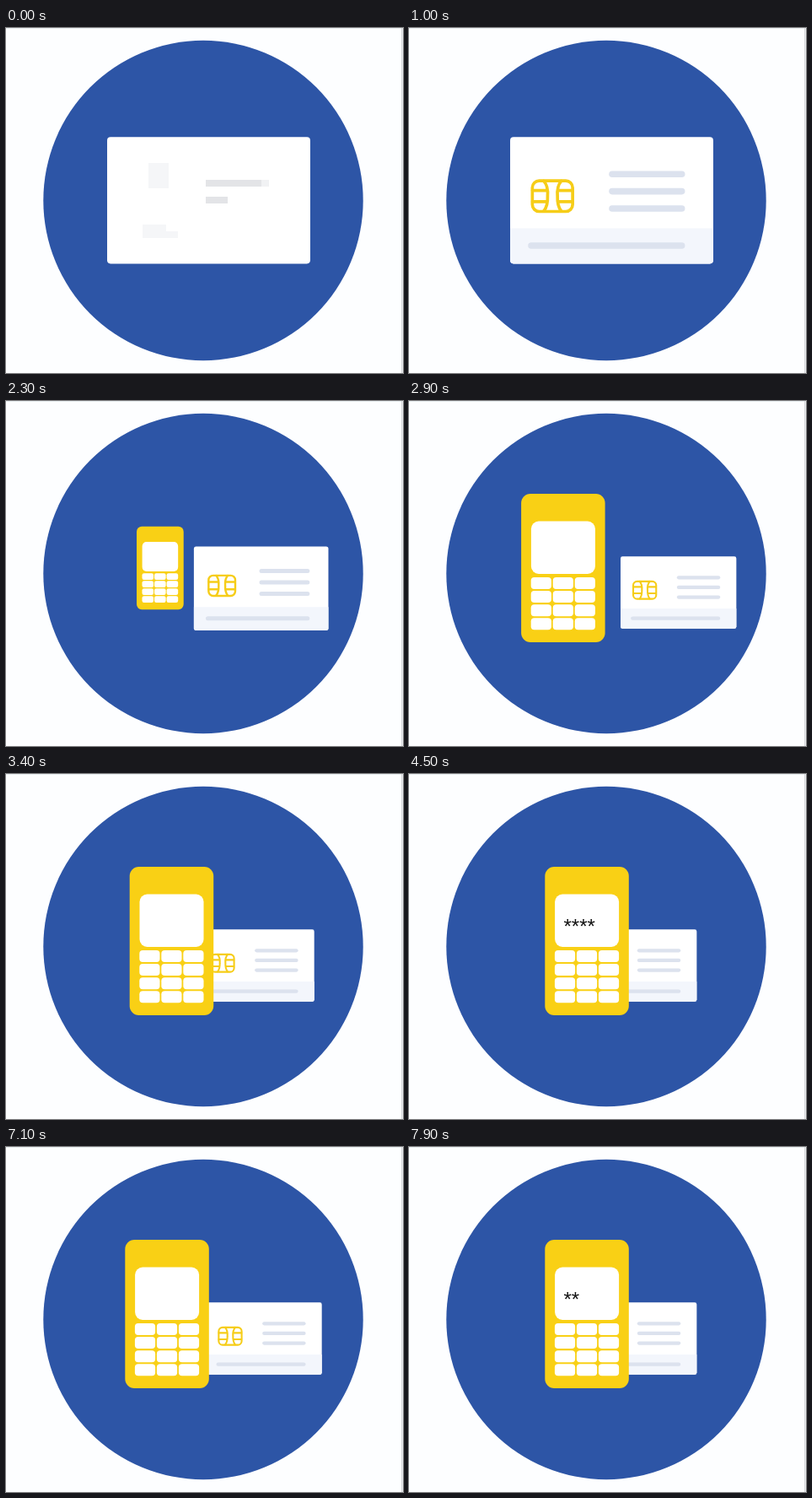
These frames come from a looping animation (471 by 409 pixels, 8 s). An HTML page:

```html
<!DOCTYPE html>
<html lang="en">
<head>
<meta charset="utf-8">
<title>Card payment</title>
<style>
  html, body { margin: 0; width: 100%; height: 100%; overflow: hidden; background: #fdfeff; }
  svg { display: block; }
  text { font: 24px "Liberation Sans", Arial, sans-serif; fill: #111; }
</style>
</head>
<body>
<svg width="471" height="409" viewBox="0 0 471 409">
  <path d="M0 .5H469" stroke="#e9eff1"/>
  <path d="M469.8 0V409" stroke="#c4c7ca"/>
  <circle cx="234" cy="204.5" r="189.7" fill="#2d55a6"/>

  <g id="card">
    <rect width="236" height="147" rx="4" fill="#fff"/>
    <path id="strip" d="M0 106H236V143a4 4 0 0 1-4 4H4a4 4 0 0 1-4-4Z" fill="#f3f6fc"/>
    <g id="lines" stroke="#dce2ee" stroke-width="7.4" stroke-linecap="round"></g>
    <g id="chip" fill="none" stroke="#f6cd18" stroke-width="3.6" stroke-linecap="round">
      <rect x="25.8" y="50.8" width="46.8" height="35.6" rx="8"/>
      <path d="M39 51Q44.5 57 43.5 68.5Q44 80 39 86M59.5 51Q54 57 55 68.5Q54.5 80 59.5 86M26 62H42M26 75H42M56.5 62H72M56.5 75H72"/>
    </g>
  </g>

  <g id="ghost">
    <path d="M169 160h24v30h-24zM162 233h28v8h14v8h-42z" fill="#f5f6f8"/>
    <path d="M237 180h66v8h-66zM237 200h26v8h-26z" fill="#e3e4e7"/>
    <path d="M303 180h9v8h-9z" fill="#f1f2f4"/>
  </g>

  <g id="phone">
    <rect y="110" width="99.5" height="176" rx="11" fill="#f9d015"/>
    <rect x="11.8" y="142.5" width="76" height="62.5" rx="9" fill="#fff"/>
    <g id="keys" fill="#fff"></g>
    <text id="pin" x="22.2" y="188.5"></text>
  </g>
</svg>
<script>
const LOOP = 8000, CYCLE = 3800;
const $ = id => document.getElementById(id);
const svgEl = (parent, tag, attrs) => {
  const el = document.createElementNS("http://www.w3.org/2000/svg", tag);
  for (const k in attrs) el.setAttribute(k, attrs[k]);
  return parent.appendChild(el);
};
const ramp = (t, from, to) => Math.min(1, Math.max(0, (t - from) / (to - from)));
const ease = (t, from, to) => { const u = ramp(t, from, to); return u * u * (3 - 2 * u); };
const mix = (a, b, u) => a + (b - a) * u;

for (let i = 0; i < 12; i++)
  svgEl($("keys"), "rect", {
    x: 11.6 + i % 3 * 26, y: 209 + Math.floor(i / 3) * 16.1, width: 24.2, height: 14, rx: 4
  });

const lines = [[118.5, 43], [118.5, 63], [118.5, 83], [24.5, 126]].map(([x, y], i) =>
  ({ x, start: 100 + i * 100, el: svgEl($("lines"), "line", { x1: x, y1: y, x2: x, y2: y }) }));

function drawCard(t, outCard) {
  const shrink = ease(t, 1670, 2570);
  const scale = mix(1.021, 0.582, shrink);
  const x = mix(120, 341 + 47 * outCard - 137, shrink);
  const y = mix(129.3, 184.3, shrink);
  $("card").setAttribute("transform", `translate(${x} ${y}) scale(${scale})`);

  for (const { x, start, el } of lines) {
    el.setAttribute("x2", mix(x, 199.5, ease(t, start, start + 500)));
    el.setAttribute("opacity", t > start ? 1 : 0);
  }
  $("strip").setAttribute("opacity", ease(t, 100, 500));
  $("chip").setAttribute("opacity", ease(t, 100, 600));
  $("ghost").setAttribute("opacity", 1 - ramp(t, 50, 250));
}

function drawPhone(t, outPhone) {
  const pop = ease(t, 1950, 2600);
  const cx = 49.75, cy = 198;
  $("phone").setAttribute("transform",
    `translate(${161.3 - 28.2 * outPhone + cx * (1 - pop)} ${cy * (1 - pop)}) scale(${pop})`);

  const typed = [3800, 4100, 4300, 4500].filter(at =>
    (t >= at && t < 5400) || t >= at + CYCLE).length;
  $("pin").textContent = "*".repeat(typed);
}

function frame(now) {
  const t = now % LOOP;
  // The card goes in, comes out, and goes in again.
  const inserted = ease(t, 3030, 3790), again = ease(t, 3030 + CYCLE, 3790 + CYCLE);
  drawCard(t, 1 - inserted + ease(t, 5950, 6710) - again);
  drawPhone(t, 1 - inserted + ease(t, 6050, 6750) - again);
  requestAnimationFrame(frame);
}
frame(performance.now());
</script>
</body>
</html>
```
